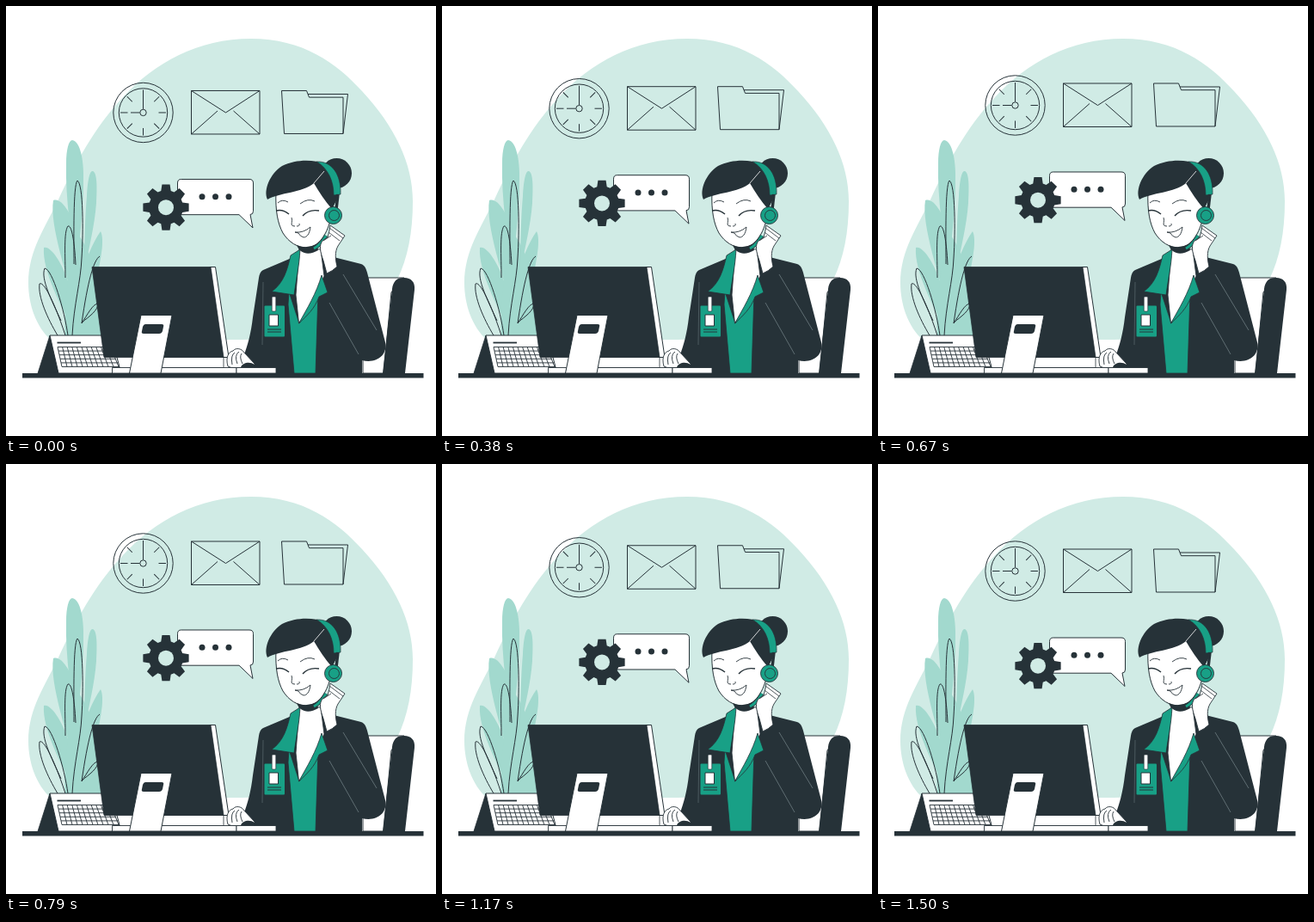
An HTML page with a canvas for the animation above (1540 ms loop, 500 by 500 pixels).

```html
<!DOCTYPE html>
<html lang="en">
<head>
<meta charset="utf-8">
<title>Customer support</title>
<style>
  html, body { margin: 0; width: 100%; height: 100%; overflow: hidden; background: #fff; }
  canvas { display: block; width: 500px; height: 500px; }
</style>
</head>
<body>
<canvas id="stage" width="500" height="500"></canvas>
<script>
const canvas = document.getElementById('stage');
const ctx = canvas.getContext('2d');

const DARK = '#263238', GREEN = '#18a086', PALE = '#d0ebe5', LEAF = '#a2d9ce', WHITE = '#fff';
const LOOP = 1540, STEPS = 37, LIFT = 9.8;

function paint(shape, fill, stroke, width = 1) {
  if (fill) {
    ctx.fillStyle = fill;
    ctx.fill(shape, 'evenodd');
  }
  if (stroke) {
    ctx.strokeStyle = stroke;
    ctx.lineWidth = width;
    ctx.stroke(shape);
  }
}
const path = (d, fill, stroke, width) => paint(new Path2D(d), fill, stroke, width);
const line = (d, width, color = DARK) => path(d, null, color, width);

function circle(x, y, r, fill, stroke, width) {
  const shape = new Path2D();
  shape.arc(x, y, r, 0, 2 * Math.PI);
  paint(shape, fill, stroke, width);
}

function box(x, y, w, h, r, fill, stroke, width) {
  const shape = new Path2D();
  shape.roundRect(x, y, w, h, r);
  paint(shape, fill, stroke, width);
}

function drawBackdrop() {
  path('M285 38C345 38 384 66 414 99C452 140 473 183 473 227C473 264 467 293 455 318C435 360 340 388 268 388C210 388 130 394 52 388C35 373 26 347 26 322C26 284 46 257 61 225C80 184 103 141 136 106C173 66 223 38 285 38Z', PALE);
}

function drawPlant() {
  const leaves = [
    'M77 156C87 157 91 183 90 204C90 244 85 270 82 310C76 270 69 225 70 183C70 167 73 156 77 156Z',
    'M101 192C106 194 106 211 105 229C103 257 96 282 91 310C91 278 92 243 94 221C95 204 97 191 101 192Z',
    'M55 226C65 222 77 243 83 266C88 288 85 325 80 350C73 318 50 255 55 226Z',
    'M44 281C53 278 68 304 74 326C79 342 79 360 77 376C65 349 42 309 44 281Z',
    'M110 262C115 272 110 295 106 315C102 342 92 365 83 384L76 384C79 340 91 289 110 262Z',
    'M69 384C66 340 76 290 84 266C96 280 110 320 110 350V384Z'
  ];
  leaves.forEach(d => path(d, LEAF));
  line('M79 300C79 268 78 209 83 203C90 207 90 263 88 293C87 320 79 346 77 383');
  line('M81 301C80 279 77 254 72 256C67 263 69 290 69 316');
  line('M72 383C68 354 54 306 45 305C40 317 53 342 64 366');
  line('M69 383C60 355 45 319 39 323C37 338 48 363 60 383');
  line('M109 291C102 295 95 320 88 369C94 360 101 346 107 346C107 354 97 361 88 368');
}

function drawCalendar() {
  path('M51 383L37 427H62Z', DARK, DARK, .8);
  path('M51 383H122L134 427H61Z', WHITE, DARK);
  line('M59.5 391.5H87', 1.8);
  for (let i = 0; i <= 5; i++) {
    const y = 396.5 + i * 4.6;
    line(`M${60 + i} ${y}H${122 + i * 2}`, .9);
  }
  for (let i = 0; i <= 11; i++) line(`M${60 + i * 5.6} 396.5L${65 + i * 6} 419.5`, .9);
}

function drawChair() {
  path('M415 427V316H463L448 333L439 427Z', WHITE, DARK);
  path('M438 427L449 329C450 320 455 315.5 463 316C471 316 476 321 475 330L464 427Z', DARK);
}

function drawJacket() {
  path('M332 293L299 307Q295 309 294 316L287 362C285 380 281 395 276 408L289 421L304 427H414V412C431 416 444 406 441 391L420 310C418 303 416 300.5 411 299.5L385 293L365 288Z', DARK);
  path('M329 332L341 369L363 333L360 427H335L328 347Z', GREEN, DARK, .8);
  path('M341 282L337 336L340.5 369L356 349L370 314L366 283Z', WHITE, DARK, .9);
  path('M331 290L342 283C341 303 337 320 335 336L309 332C323 322 327 307 331 290Z', GREEN, DARK, .8);
  path('M340.5 369C350 352 361 334 367 313L374 333L364 338C359 352 350 360 340.5 369Z', GREEN, DARK, .8);
  line('M392 312L431 377', .7, '#78878b');
  line('M376 345L410 405', .7, '#78878b');
  line('M299 321L298 394', .6, '#657479');
}

function drawBadge() {
  box(300.5, 348.5, 23.5, 36, 1, GREEN);
  box(309.2, 338, 4.6, 17, 1, WHITE, DARK, .7);
  box(306, 359, 10.5, 13, 0, WHITE, DARK, 1);
  line('M304 376H320M304 379H320', 1);
}

function drawHead() {
  circle(384.5, 194.5, 17.5, DARK);
  path('M314 216C313 238 316 253 322 264C329 275 339 281 350 281C362 280 371 269 376 253L383 220L355 195Z', WHITE, DARK);
  path('M304 225C299 214 307 195 321 186C337 178 358 178 371 184C383 190 388 205 387 221L379 236C371 227 364 216 358 206C345 217 318 217 304 225Z', DARK);
  line('M370 192L358 206', .8, WHITE);
  path('M361 181C379 180 390 196 389 219L381 220C381 204 375 189 361 181Z', GREEN, DARK, .7);
  line('M386 219L384 236', 3.5);

  line('M316 229Q321 224 328 228M342 230Q351 223 359 227', .9);
  line('M314 238Q322 236 329 242M345 244Q352 236 364 238', 1.4);
  line('M332 246C334 251 329 256 336 256M341 253Q342 256 338 256', .9);
  path('M336 263Q346 264 354 257C353 265 350 269 346 269Q342 268 340 264Z', WHITE, DARK, .9);

  path('M338 278Q349 283 361 277L363 284C353 290 342 289 338 278Z', DARK);
  line('M358 282Q367 277 372 267', 4.5);
  line('M358 282Q367 277 372 267', 3, GREEN);
}

function drawRaisedHand() {
  path('M377 255L394 267L386 279C382 286 383 295 385 303Q380 308 373 311L369 296C365 285 364 278 368 273L374 269Q376 263 377 255Z', WHITE, DARK, .9);
  line('M376 258L392 270M375 263L388 273M369 273L378 267', .8);
  circle(380.5, 243.5, 10, GREEN, DARK, .9);
  circle(381.5, 243.5, 6, null, DARK, .9);
}

function drawMonitor() {
  path('M180 408.5H253V420.5H180Z', WHITE, DARK, .8);
  path('M237 303.5H243.5L259 408.5H252Z', WHITE, DARK);
  path('M100 303.5H238L253 408.5H114Z', DARK, DARK, .8);
  path('M123.5 420.5H268V427H123.5Z', WHITE, DARK, .9);
  path('M157 359.5H193L180 427H143.5Z', WHITE, DARK);
  path('M162 370H181Q184 370 183 373L182 378Q181 381 178 381H160Q157 381 158 378L159 373Q160 370 162 370Z', DARK);
}

function drawMouseHand() {
  path('M268 420.5H314V427H268Z', WHITE, DARK, .9);
  path('M258 419C255 408 259 402 264 401C267 397 274 398 277 403L289 416V420.5H262Z', WHITE, DARK, .9);
  line('M263 417Q261 406 266 403M269 416Q265 406 271 402M275 416Q271 408 274 404', .9);
  path('M273 420C275 415 283 413 289 417V420Z', DARK);
}

function drawScene() {
  drawBackdrop();
  drawPlant();
  drawCalendar();
  drawChair();
  drawJacket();
  drawBadge();
  drawHead();
  drawRaisedHand();
  drawMonitor();
  drawMouseHand();
  path('M19 427H485.5V432.5H19Z', DARK);
}

function drawClock() {
  ctx.save();
  ctx.translate(159.5, 124.5);
  circle(0, 0, 34.7, null, DARK);
  circle(0, 0, 28.2, null, DARK);
  circle(0, 0, 3.7, null, DARK);
  line('M0 -4V-20M-4 0H-14.5');
  for (let i = 0; i < 8; i++) {
    line('M0 -18V-26.5');
    ctx.rotate(Math.PI / 4);
  }
  ctx.restore();
}

function drawGear() {
  const gear = new Path2D();
  const teeth = 8, pitch = 2 * Math.PI / teeth;
  const corners = [[-.29, 20], [-.17, 27], [.17, 27], [.29, 20]];
  for (let i = 0; i < teeth; i++) {
    for (const [a, r] of corners) {
      const angle = i * pitch + a;
      gear.lineTo(186 + r * Math.cos(angle), 234.7 + r * Math.sin(angle));
    }
  }
  gear.closePath();
  paint(gear, DARK);
  circle(186, 234.7, 9, PALE);
}

function drawIcons() {
  drawClock();
  box(215.5, 99, 79.5, 50.5, 0, null, DARK);
  line('M215.5 99L255.5 124.5L295 99M215.5 149.5L246 122.5M295 149.5L264.5 122.5');
  line('M320.5 99H349.5L352.5 106.7H392V149H323.5Z');
  line('M351 103H397.5L392 149');
  path('M203.5 202H283Q287.5 202 287.5 206.5V239Q287.5 243 284 243L287 258.5L271 243.2H203.5Q199.5 243.2 199.5 239V206.5Q199.5 202 203.5 202Z', WHITE, DARK);
  [228, 243.5, 259].forEach(x => circle(x, 222.3, 3.5, DARK));
  drawGear();
}

// Linear rise and fall, held for each 24 fps step.
function liftAt(time) {
  const step = Math.floor((time % LOOP + 5) / LOOP * STEPS) + 1;
  const phase = step % STEPS / STEPS;
  return LIFT * (1 - Math.abs(2 * phase - 1));
}

let start;
function render(now) {
  start ??= now;
  ctx.clearRect(0, 0, 500, 500);
  drawScene();
  ctx.save();
  ctx.translate(0, -liftAt(now - start));
  drawIcons();
  ctx.restore();
  requestAnimationFrame(render);
}
requestAnimationFrame(render);
</script>
</body>
</html>
```
